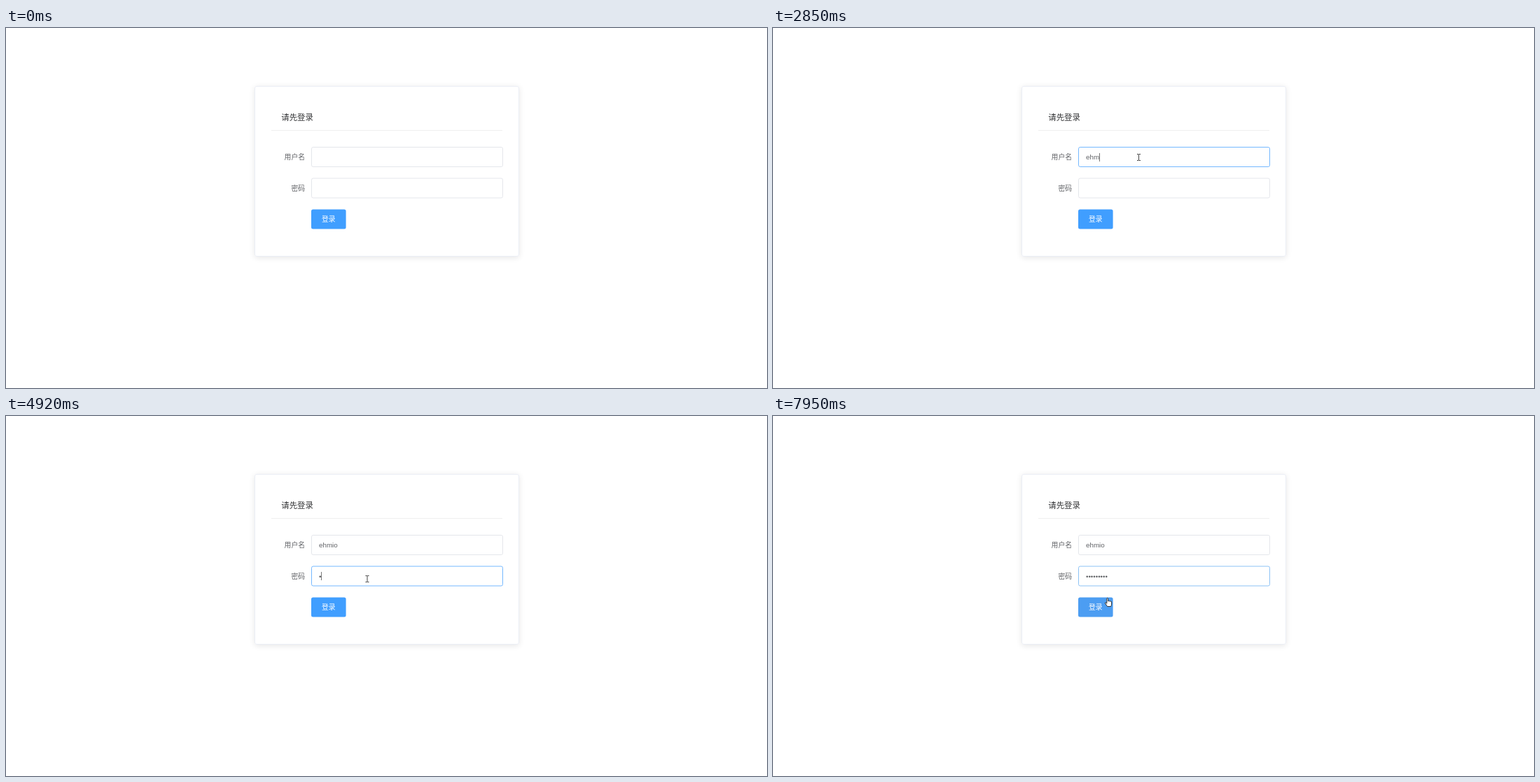
Animation, 1087 px wide and 515 px high, one loop 8000 ms. Source, as an HTML page:

```html
<!DOCTYPE html>
<html lang="zh-CN">
<head>
<meta charset="utf-8">
<title>登录</title>
<style>
  html, body { margin: 0; width: 100%; height: 100%; overflow: hidden; background: #fff; }
  .card {
    position: absolute; left: 355px; top: 83px; width: 378px; height: 244px;
    box-sizing: border-box; border: 1px solid #ebeef5; border-radius: 3px;
    box-shadow: 0 1.4px 8.4px rgba(0, 0, 0, .1);
  }
  svg { position: absolute; left: 0; top: 0; }
  text { font: 9.8px "Noto Sans CJK SC", "Noto Sans CJK", sans-serif; fill: #606266; }
  .title { font-size: 11.4px; fill: #303133; }
  .value { font-family: "Liberation Sans", Arial, sans-serif; }
  .field { fill: #fff; }
</style>
</head>
<body>
<div class="card"></div>
<svg width="1087" height="515">
  <text class="title" x="393.3" y="131.6">请先登录</text>
  <path d="M379 146.5H709" stroke="#efefef"/>
  <text x="427" y="188.2" text-anchor="end">用户名</text>
  <text x="427" y="232.9" text-anchor="end">密码</text>
  <rect class="field" id="userBox" x="436.5" y="170.5" width="273" height="28" rx="2.3"/>
  <rect class="field" id="passBox" x="436.5" y="215" width="273" height="28" rx="2.3"/>
  <text class="value" id="user" x="447" y="188"></text>
  <text class="value" id="pass" x="447" y="232.6"></text>
  <rect id="button" x="436" y="259.5" width="49.6" height="28" rx="2.5"/>
  <text x="460.7" y="277.2" text-anchor="middle" style="fill:#fff">登录</text>
  <rect id="caret" width="1" height="12" fill="#777"/>
  <g id="mouse">
    <circle id="click" cx="-1" cy="-.5" r="8.3" fill="#ff0" fill-opacity=".6"/>
    <path id="beam" d="M-2.5 -4.5h2l.5 .5 .5-.5h2M0-4V4M-2.5 4.5h2l.5-.5 .5 .5h2" fill="none" stroke="#444"/>
    <path id="arrow" d="M.4 .5V10.2L2.6 8.1 4.2 11.6 5.6 11 4.1 7.5H7Z" fill="#fff" stroke="#222" stroke-width=".8"/>
    <path id="hand" d="M-.8 1Q.2-.4 1.1 1V5Q2 4 2.9 5 3.8 4.3 4.6 5.3 5.6 4.8 6 6V9Q6 10.5 5 12.5H0L-3 8.2Q-3.6 6.8-2.4 6.8L-.8 8.2Z" fill="#fff" stroke="#222" stroke-width=".9"/>
  </g>
</svg>
<script>
const $ = id => document.getElementById(id);
const LOOP = 8000, NAME = 'ehmio';
const GRAY = '#e4e6eb', HOVER = '#c8cbd2', HALF = '#9cc4ee', FOCUS = '#74b8ff', BLUE = '#409eff';
const nameTimes = [1900, 2300, 2850, 3080, 3230];
const passTimes = [4920, 5150, 5470, 5780, 6010, 6320, 6640, 6940, 7260];
const nameStops = [447, 452, 457, 466, 468, 473];
const userBorder = [[0, GRAY], [980, HOVER], [1060, HALF], [1120, FOCUS], [4460, HALF], [4540, GRAY]];
const passBorder = [[0, GRAY], [4310, HOVER], [4460, HALF], [4540, FOCUS], [7950, '#8cc2f5']];
const buttonFill = [[0, BLUE], [7870, '#48a2ff'], [7950, '#4c9df2']];

const within = (t, a, b) => t >= a && t < b;
const typed = (t, times) => times.filter(s => s <= t).length;
const stepAt = (t, list) => list.filter(e => e[0] <= t).pop()[1];

// Position on a move sampled in n equal steps, easing out with power e.
function glide(t, t0, t1, n, from, to, e) {
  const p = Math.min(1, Math.floor((t - t0) / (t1 - t0) * n + .03) / n);
  const k = 1 - (1 - p) ** e;
  return from.map((v, i) => v + (to[i] - v) * k);
}

function pointer(t) {
  if (t < 150) return [null, [0, 0]];
  if (t < 980) return ['arrow', glide(t, 150, 670, 7, [1012, 508], [521, 171], 1.7)];
  if (t < 4010) return ['beam', [522.5, 185]];
  if (t < 7490) {
    const pos = glide(t, 4010, 4390, 5, [522.5, 192.5], [516, 233], 1.3);
    return [within(pos[1], 199, 215) ? 'arrow' : 'beam', pos];
  }
  const pos = glide(t, 7490, 7950, 6, [510, 235], [477.6, 260], 4);
  return [t >= 7870 ? 'hand' : pos[1] < 244 ? 'beam' : 'arrow', pos];
}

function draw(t) {
  const n = typed(t, nameTimes), m = typed(t, passTimes);
  $('user').textContent = NAME.slice(0, n);
  $('pass').textContent = '•'.repeat(m);
  $('userBox').style.stroke = stepAt(t, userBorder);
  $('passBox').style.stroke = stepAt(t, passBorder);
  $('button').style.fill = stepAt(t, buttonFill);

  const inPass = t >= 4390;
  const lit = within(t, 980, 1520) || within(t, 1900, 3690) || within(t, 4220, 7800);
  $('caret').style.display = lit ? '' : 'none';
  $('caret').setAttribute('x', !inPass ? nameStops[n] : m ? Math.floor(446.52 + 3.49 * m) : 447);
  $('caret').setAttribute('y', inPass ? 223 : 179);

  const [kind, [x, y]] = pointer(t);
  $('mouse').setAttribute('transform', `translate(${x} ${y})`);
  for (const id of ['beam', 'arrow', 'hand']) $(id).style.display = id === kind ? '' : 'none';
  $('click').style.display = within(t, 980, 1120) || within(t, 4390, 4540) ? '' : 'none';
}

const start = performance.now();
function frame() {
  draw((performance.now() - start) % LOOP);
  requestAnimationFrame(frame);
}
frame();
</script>
</body>
</html>
```
